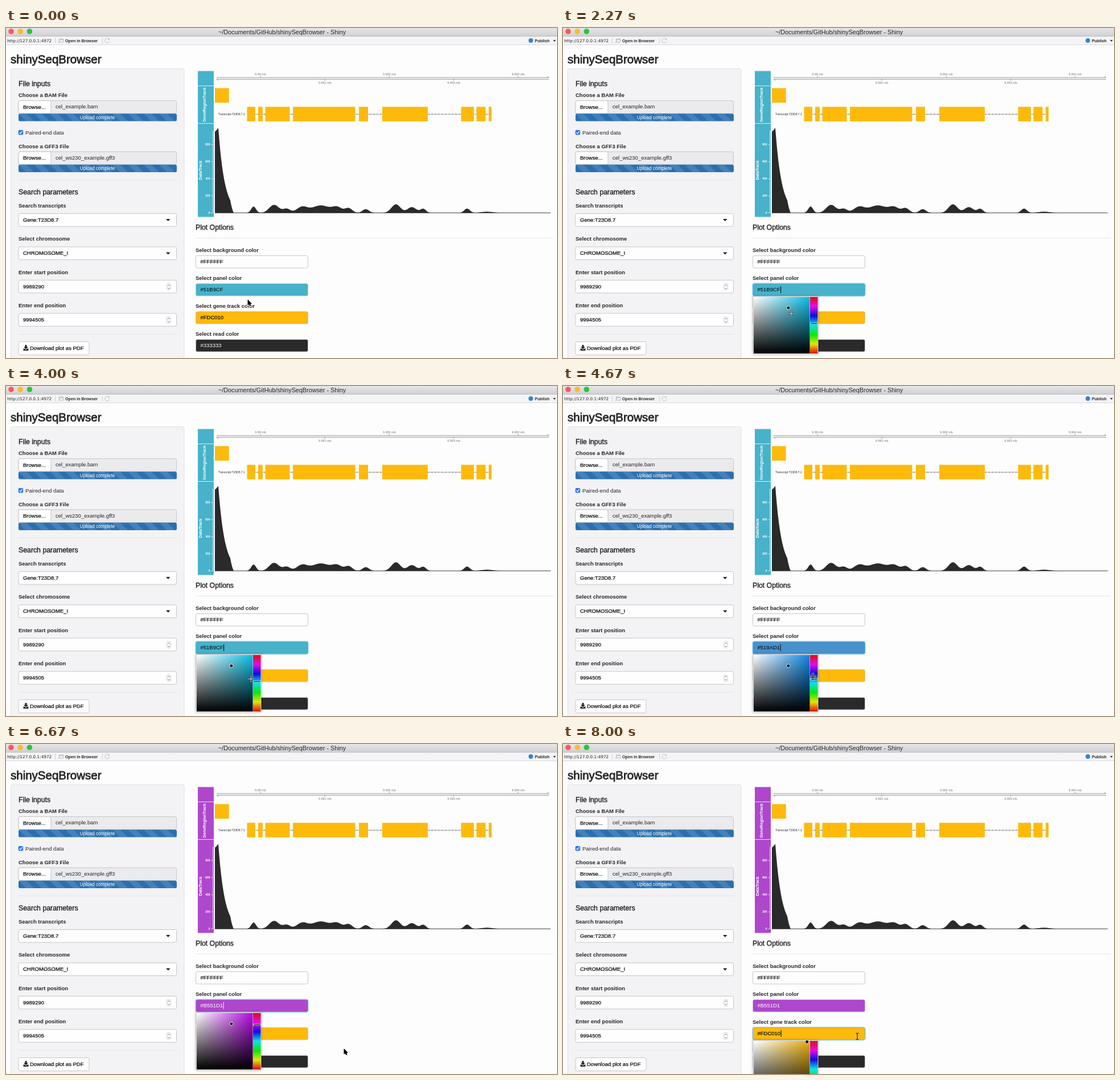
An HTML page that plays this animation: 968 px wide and 579 px high, repeating every 8070 ms.

```html
<!DOCTYPE html>
<html lang="en">
<head>
<meta charset="utf-8">
<title>shinySeqBrowser</title>
<style>
html, body { margin: 0; width: 100%; height: 100%; overflow: hidden; background: #fefdfe; }
svg { display: block; }
text { font-family: "Liberation Sans", Arial, sans-serif; fill: #262626; white-space: pre; }
.b { font-weight: bold; }
.h { stroke: #262626; stroke-width: .4px; }
.v { fill: #000; stroke: #000; stroke-width: .2px; }
.w { fill: #fff; }
.g { fill: #777; }
</style>
</head>
<body>
<svg id="stage" width="968" height="579" viewBox="0 0 968 579"></svg>
<script>
const LOOP = 8070;
const PANEL_OPEN = 1100, PANEL_CLOSE = 7760, GENE_OPEN = 7860;
const DRAG = 4420, DRAG_TIME = 1000;
const PLOT_OFF = 5470, PLOT_ON = 6400;
const HUE_FROM = 190.5, HUE_TO = 286.9, GENE_HUE = 44.6;
const stage = document.getElementById('stage');

const clamp = v => Math.max(0, Math.min(1, v));
const ease = u => u * u * (3 - 2 * u);

// Screen rendering darkens the nominal colours a little.
const shade = rgb => `rgb(${rgb.map(v => Math.round(255 * (v / 255) ** 1.12))})`;
const hex = rgb => '#' + rgb.map(v => v.toString(16).padStart(2, '0')).join('').toUpperCase();
const pure = hue => `hsl(${hue} 90% 47%)`;
const YELLOW = shade([253, 192, 16]), DARK = shade([51, 51, 51]), BLUE = shade([51, 122, 183]);

const text = (x, y, s, size = 9.5, cls = '', more = '') =>
  `<text x="${x}" y="${y}" font-size="${size}" class="${cls}" ${more}>${s}</text>`;
const rect = (x, y, w, h, fill, more = '') =>
  `<rect x="${x}" y="${y}" width="${w}" height="${h}" fill="${fill}" ${more}/>`;
const path = (d, stroke, width = 1, more = '') =>
  `<path d="${d}" fill="none" stroke="${stroke}" stroke-width="${width}" ${more}/>`;
const solid = (d, fill) => `<path d="${d}" fill="${fill}"/>`;
const box = (x, y, w, h, fill = '#fefefe', more = '') =>
  rect(x, y, w, h, fill, `rx="2.7" stroke="#c6c6c8" ${more}`);
const mid = 'text-anchor="middle"';

function windowBar() {
  const lights = ['#fc5a55', '#fdba2f', '#2ac53f'].map((c, i) =>
    `<circle cx="${9 + i * 16.2}" cy="6" r="4.8" fill="${c}"/>`).join('');
  return rect(0, 0, 968, 14.5, 'url(#bar)') + rect(0, 14.5, 968, 15, '#f4f4f7') +
    path('M0 14.5H968', '#bdbdbd') + path('M0 29.5H968', '#d9d9dc') + lights +
    text(485, 10.5, '~/Documents/GitHub/shinySeqBrowser - Shiny', 10.8, '', mid) +
    text(2, 25, 'http://127.0.0.1:4972', 7.3, '', 'style="font-family:\'DejaVu Sans\',sans-serif"') +
    path('M86.5 17V27M169.5 17V27', '#cfcfd2') +
    path('M93.5 19h7v6h-7zM93.5 20.5h7M91.5 26l4-4', '#b4bcc6') +
    text(104, 25, 'Open in Browser', 7.15, 'b') +
    path('M181 19.5a4 4 0 1 0 .8 3.5M181.5 18v2.5h-2.5', '#c0c3c8') +
    '<circle cx="922" cy="22" r="4" fill="#3488c6"/>' +
    text(929, 25, 'Publish', 7.15, 'b') + solid('M961 21h5l-2.5 3z', '#333');
}

const fileInput = (y, label, name) => text(22, y - 6.4, label, 9.5, 'b') +
  box(22, y, 277.5, 22.5, '#ebeaed') + box(22, y, 57, 22.5) +
  text(30, y + 14, 'Browse...', 9.5, 'v') + text(87, y + 13.5, name) +
  `<g transform="translate(22 ${y + 22.8})">` + rect(0, 0, 278, 13.2, BLUE, 'rx="2.5"') +
  rect(0, 0, 278, 13.2, 'url(#stripes)', 'rx="2.5"') +
  text(138.5, 9.6, 'Upload complete', 8.2, 'w', mid) + '</g>';

const valueBox = (y, label, value) => text(22, y - 10.6, label, 9.5, 'b') +
  box(22, y, 277.5, 22.5) + text(30, y + 14.2, value, 9.5, 'v');

const select = (y, label, value) => valueBox(y, label, value) +
  solid(`M281 ${y + 9.5}h7.5l-3.75 4z`, '#222');

const spin = (y, label, value) => valueBox(y, label, value) +
  box(282.5, y + 5.5, 7, 12, '#fafafa', 'stroke-width=".7"') +
  path(`M284 ${y + 10}l2-2 2 2M284 ${y + 13.5}l2 2 2-2`, '#666', .9);

function sidebar() {
  return rect(8.5, 71.5, 304.5, 520, '#f3f2f5', 'rx="3" stroke="#dfdee1"') +
    text(22, 102.3, 'File inputs', 12.3, 'h') +
    fileInput(127.5, 'Choose a BAM File', 'cel_example.bam') +
    rect(21.7, 179, 8.5, 8.5, '#2f78ee', 'rx="2"') +
    path('M23.7 183.4l1.7 1.9 3-4.2', '#fff', 1.3) +
    text(34, 186.5, 'Paired-end data') +
    fileInput(217, 'Choose a GFF3 File', 'cel_ws230_example.gff3') +
    path('M22 266.5H300M22 537.5H300', '#e4e3e6') +
    text(22, 291.5, 'Search parameters', 12.3, 'h') +
    select(325.6, 'Search transcripts', 'Gene:T23D8.7') +
    select(384, 'Select chromosome', 'CHROMOSOME_I') +
    spin(442.4, 'Enter start position', '9989290') +
    spin(500.8, 'Enter end position', '9994505') +
    box(22, 550.5, 124, 23) +
    solid('M33.5 556h3v3.5h2.5l-4 4-4-4h2.5zM30.5 562.5h2l2.5 2 2.5-2h2v3.500h-9z', '#222') +
    text(42, 565, 'Download plot as PDF', 9.5, 'v');
}

function geneAxis() {
  let ticks = '';
  for (let i = 0; i < 5; i++) {
    const x = 447 + i * 113.2, up = i % 2 == 0;
    ticks += path(up ? `M${x} 87v-3` : `M${x} 89.5v3`, '#888', .8) +
      text(x, up ? 83 : 98, +(9.99 + i / 1000).toFixed(3) + ' mb', 5.4, 'g', mid);
  }
  return path('M370 87H954l-3-2M954 90H370l3 2', '#858585', .9) + ticks;
}

function genes() {
  // start and width of each exon
  const exons = [[423.5, 14.5], [443, 8], [455.5, 43], [504, 109.5], [620, 16], [661, 80],
    [799.5, 22.5], [826.5, 16], [848, 5]];
  return rect(367, 105.5, 24.7, 25.5, YELLOW) +
    text(373, 153, 'Transcript:T23D8.7.1', 5) +
    path('M424 151.3H850', '#888', .8) +
    path('M424 151.3H850', '#888', 2.2, 'stroke-dasharray="1 5"') +
    exons.map(([x, w]) => rect(x, 138.3, w, 25.5, YELLOW)).join('');
}

// Read depth: a steep decay at the left, then rounded hills of [centre, height, width].
const HILLS = [[435, 11, 6], [471, 14, 12], [493, 7, 9], [520, 10, 13], [553, 13, 22], [582, 9, 12],
  [602, 8, 9], [632, 6.5, 8], [685, 15, 11], [713, 10, 11], [733, 7, 7], [810, 7.5, 7], [845, 2, 14]];

function depth(x) {
  const peak = x < 373 ? 143 + 6 * clamp((x - 368) / 5) : 149 * Math.exp((373 - x) / 11);
  return HILLS.reduce((sum, [c, h, w]) => sum + h * Math.exp(-(((x - c) / w) ** 2)),
    peak * clamp((400 - x) / 6));
}

function coverage() {
  let d = 'M367 324.8';
  for (let x = 367; x <= 957; x++) d += `L${x} ${(324.3 - depth(x)).toFixed(1)}`;
  return solid(d + 'V324.8Z', DARK) + path('M367 324.3H957', '#444', .8);
}

function panel() {
  const turned = (x, y, s) => text(0, 0, s, 7.1, 'b w', `${mid} transform="translate(${x} ${y}) rotate(-90)"`);
  let axis = path('M363.5 180V324.5', '#fff', .7);
  for (let i = 0; i < 5; i++) {
    const y = 324.5 - i * 30;
    axis += path(`M360.5 ${y}h3`, '#fff', .7) + text(358.5, y + 1.8, i * 200, 4.9, 'b w', 'text-anchor="end"');
  }
  return rect(337, 75.5, 28, 256, '', 'id="panel"') +
    path('M337 101.5h28M337 167.5h28', '#fff', .8) +
    turned(350.5, 134.5, 'GeneRegionTrack') + turned(344, 249.5, 'DataTrack') + axis;
}

const FIELD_TOP = 399.5, FIELD_STEP = 49;
function colorField(row, label, id, fill, value, cls = 'v') {
  const y = FIELD_TOP + row * FIELD_STEP;
  return text(333, y - 6.3, label, 9.5, 'b') +
    box(333.5, y, 197, 21.5, fill, `id="${id}"`) + text(341.5, y + 13.7, value, 9.5, cls, `id="${id}Text"`);
}

function hueStops() {
  let stops = '';
  for (let i = 0; i <= 12; i++) stops += `<stop offset="${i / 12}" stop-color="${pure(360 - i * 30)}"/>`;
  return stops;
}

// Saturation square plus hue strip; the dot sits at fractions s and v.
const picker = (id, y, s, v) => `<g id="${id}" transform="translate(334 ${y})">` +
  rect(0, 0, 114, 101, '#fff', 'stroke="#bbb" filter="url(#shadow)"') +
  rect(1, 1, 98.5, 99, '', `id="${id}Base"`) +
  rect(1, 1, 98.5, 99, 'url(#white)') + rect(1, 1, 98.5, 99, 'url(#black)') +
  rect(100, 1, 13.5, 99, 'url(#hues)') +
  `<circle cx="${1.6 + s * 99}" cy="${1.6 + (1 - v) * 99}" r="3" fill="#000" stroke="#fff" stroke-width=".9"/>` +
  rect(100.5, 0, 12.5, 2, '#000', `id="${id}Slider" stroke="#fff" stroke-width=".7"`) + '</g>';

const glyph = (id, d, outline, ink, fill = 'none') => `<g id="${id}">` +
  path(d, outline, 2.6) + `<path d="${d}" fill="${fill}" stroke="${ink}"/></g>`;

stage.innerHTML = `<defs>
  <linearGradient id="bar" x2="0" y2="1"><stop stop-color="#e6e5e7"/><stop offset="1" stop-color="#d0cfd1"/></linearGradient>
  <linearGradient id="white"><stop stop-color="#fff"/><stop offset="1" stop-color="#fff" stop-opacity="0"/></linearGradient>
  <linearGradient id="black" x2="0" y2="1"><stop stop-opacity="0"/><stop offset="1" stop-color="#000"/></linearGradient>
  <linearGradient id="hues" x2="0" y2="1">${hueStops()}</linearGradient>
  <pattern id="stripes" width="27.5" height="13.75" patternUnits="userSpaceOnUse">
    <path d="M0 0h13.75l13.75 13.75h-13.75z" fill="#fff" fill-opacity=".12"/></pattern>
  <filter id="shadow" x="-20%" y="-20%" width="140%" height="140%">
    <feDropShadow dx="0" dy="0" stdDeviation="2" flood-opacity=".3"/></filter>
  <filter id="glow" x="-10%" y="-50%" width="120%" height="200%">
    <feDropShadow dx="0" dy="0" stdDeviation="1.6" flood-color="#66afe9" flood-opacity=".7"/></filter>
</defs>` + rect(0, 0, 968, 579, '#fefdfe') + windowBar() +
  text(8, 61.5, 'shinySeqBrowser', 20.5, 'h', 'style="stroke-width:.8px"') + sidebar() +
  '<g id="plot">' + panel() + geneAxis() + genes() + coverage() + '</g>' +
  '<g id="spinner">' + [637, 645, 653].map(x => rect(x, 0, 5.8, 0, '#1166cc')).join('') + '</g>' +
  text(333, 353.5, 'Plot Options', 12.3, 'h') + path('M333 368.5H962', '#e6e5e7') +
  colorField(0, 'Select background color', 'back', '#fefefe', '#FFFFFF') +
  colorField(1, 'Select panel color', 'field', '', '', '') +
  colorField(2, 'Select gene track color', 'gene', YELLOW, '#FDC010') +
  colorField(3, 'Select read color', 'read', DARK, '#333333', 'w') +
  '<path id="caret"/>' +
  picker('panelPick', 471, .61, .815) + picker('genePick', 520, .94, .99) +
  '<g id="cursor">' +
  glyph('arrow', 'M0 0V9l2.1-1.9 1.5 3.4 1.4-.6-1.5-3.300h2.700z', '#fff', '#000', '#000') +
  glyph('beam', 'M-2.5-6Q0-6 0-4Q0-6 2.5-6M0-4V4M-2.5 6Q0 6 0 4Q0 6 2.5 6', '#ffffff44', '#000') +
  glyph('cross', 'M-5.500 0H5.500M0-5.500V5.500', '#222', '#fff') +
  glyph('resize', 'M-5.500-1H5.500M-5.500 1.300H5.500M0-5.500V6M-2-3.500L0-5.500 2-3.500M-2 4L0 6 2 4', '#ffffffaa', '#000') +
  '</g>';

const el = {};
stage.querySelectorAll('[id]').forEach(e => el[e.id] = e);
const set = (e, props) => { for (const k in props) e.setAttribute(k, props[k]); };
const show = (e, on) => { e.style.display = on ? '' : 'none'; };

// Pointer stops: time, x, y.
const STOPS = [[0, 425, 477], [1150, 416, 461], [1600, 398, 490], [2270, 401, 501], [3270, 410, 507],
  [DRAG, 439, 517], [4670, 439, 510], [DRAG + DRAG_TIME, 439, 491], [5800, 439, 491],
  [6670, 594, 535], [7650, 517, 513], [LOOP, 517, 513]];

function pointer(t) {
  const i = STOPS.findIndex(stop => stop[0] > t), a = STOPS[i - 1], b = STOPS[i];
  const u = ease((t - a[0]) / (b[0] - a[0]));
  return [1, 2].map(j => a[j] + (b[j] - a[j]) * u);
}

function panelColor(hue) {
  const top = hue > HUE_FROM ? 209 : 207, low = 81;
  return [5, 3, 1].map(n => {
    const k = (n + hue / 60) % 6;
    return Math.round(top - (top - low) * clamp(Math.min(k, 4 - k)));
  });
}

function drawPicker(id, hue, opacity) {
  show(el[id], opacity > 0);
  set(el[id], { opacity });
  set(el[id + 'Base'], { fill: pure(hue) });
  set(el[id + 'Slider'], { y: 99 - hue / 360 * 99 });
}

function focus(id, on) {
  set(el[id], { stroke: on ? '#66afe9' : '#c6c6c8', filter: on ? 'url(#glow)' : 'none' });
}

function drawCursor(x, y, panelOpen) {
  const inPicker = panelOpen && x > 334 && x < 448 && y > 471 && y < 572;
  const inField = x > 333 && x < 531 && y > FIELD_TOP && (y - FIELD_TOP) % FIELD_STEP < 22;
  const shape = inPicker ? (x > 434 ? 'resize' : 'cross') : inField ? 'beam' : 'arrow';
  for (const id of ['arrow', 'beam', 'cross', 'resize']) show(el[id], id == shape);
  set(el.cursor, { transform: `translate(${x} ${y})` });
}

// Each bar stretches for most of a second, one after the other.
function drawSpinner(t) {
  [...el.spinner.children].forEach((bar, i) => {
    const p = (t / 1000 + .07 + (2 - i) * .16) % 1;
    const k = ease(clamp(1 - Math.abs(p - .4) / .4));
    set(bar, { y: 193 - 10.7 * k, height: 21.4 + 16 * k });
  });
}

function draw(now) {
  const t = now % LOOP, [x, y] = pointer(t);
  const hue = HUE_FROM + (HUE_TO - HUE_FROM) * ease(clamp((t - DRAG) / DRAG_TIME));
  const rgb = panelColor(hue);
  const luma = (rgb[0] * 299 + rgb[1] * 587 + rgb[2] * 114) / 1000;
  const ink = luma < 128 ? '#fff' : '#000';
  const onPanel = t >= PANEL_OPEN && t < PANEL_CLOSE, onGene = t >= GENE_OPEN;
  const loading = t >= PLOT_OFF && t < PLOT_ON;

  show(el.plot, !loading);
  show(el.spinner, loading);
  drawSpinner(t);
  set(el.panel, { fill: shade(t < PLOT_ON ? panelColor(HUE_FROM) : rgb) });
  set(el.field, { fill: shade(rgb) });
  el.fieldText.textContent = hex(rgb);
  el.fieldText.style.fill = ink;
  focus('field', onPanel);
  focus('gene', onGene);

  show(el.caret, onPanel || onGene);
  const label = onGene ? el.geneText : el.fieldText;
  const top = FIELD_TOP + FIELD_STEP * (onGene ? 2 : 1) + 4.5;
  set(el.caret, {
    d: `M${342.5 + label.getComputedTextLength()} ${top}v12`,
    stroke: onGene ? '#000' : ink
  });

  drawPicker('panelPick', hue, clamp((t - PANEL_OPEN) / 100) * clamp(1 - (t - PANEL_CLOSE) / 100));
  drawPicker('genePick', GENE_HUE, clamp((t - GENE_OPEN) / 100));
  drawCursor(x, y, onPanel);
}

const start = performance.now();
(function tick() {
  draw(performance.now() - start);
  requestAnimationFrame(tick);
})();
</script>
</body>
</html>
```
